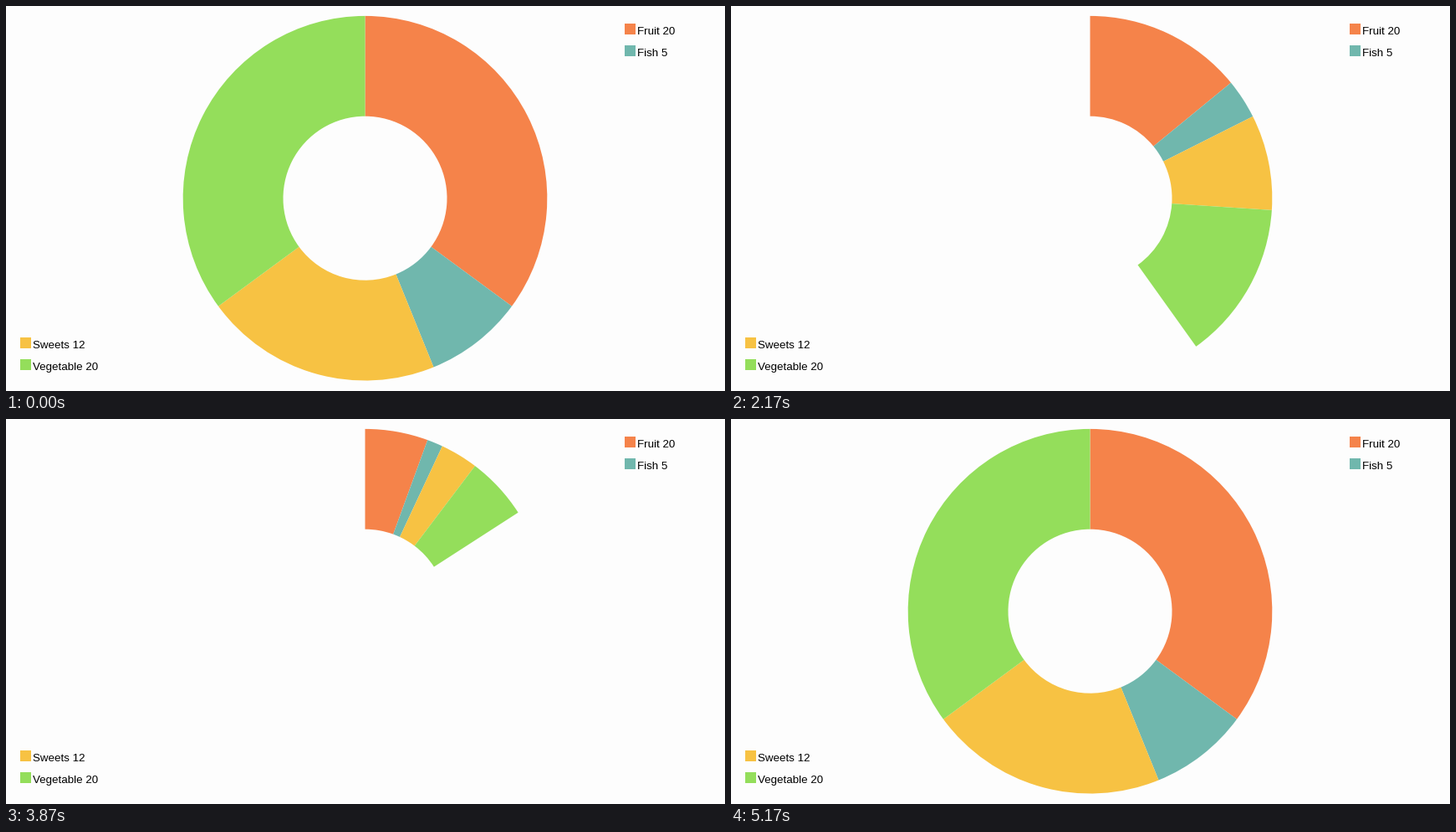
Animation of 860x460 px, one loop 7.4 s. Source, as a matplotlib script:

```python
import numpy as np
import matplotlib.pyplot as plt
from matplotlib.animation import FuncAnimation
from matplotlib.patches import Rectangle, Wedge

WIDTH, HEIGHT, DPI = 860, 460, 80
LOOP, INTERVAL = 7400, 20
STEP = LOOP / 170  # the ring is redrawn less often than the figure

CENTER, OUTER, INNER = (429.5, 229.7), 217.8, 98

# name, value, colour, legend swatch corner
SLICES = [
    ("Fruit", 20, "#f5834a", (740, 20.5)),
    ("Fish", 5, "#70b7ad", (740, 46.5)),
    ("Sweets", 12, "#f7c243", (17, 396)),
    ("Vegetable", 20, "#94de5b", (17, 422)),
]
values = np.array([s[1] for s in SLICES])
bounds = np.concatenate([[0], np.cumsum(values)]) / values.sum()

# Redraw step -> phase: 0 to 1 closes the ring, 1 to 2 opens it again
STEPS = [24.5, 35, 50, 63, 72.4, 79, 92, 97, 110, 119]
PHASES = [0, 0.219, 0.5354, 0.8032, 1, 1.1353, 1.403, 1.5234, 1.792, 2]


def ease(x):
    """Cubic ease in and out."""
    return 4 * x**3 if x < 0.5 else 1 - 4 * (1 - x)**3


def ring_part(ms):
    """Fraction of the full circle that is drawn at a given time."""
    step = int((ms + 18) / STEP)
    phase = np.interp(step, STEPS, PHASES)
    return 1 - ease(phase) if phase < 1 else ease(phase - 1)


fig = plt.figure(figsize=(WIDTH / DPI, HEIGHT / DPI), dpi=DPI,
                 facecolor="#fdfdfd")
ax = fig.add_axes([0, 0, 1, 1])
ax.set(xlim=(0, WIDTH), ylim=(HEIGHT, 0))
ax.axis("off")

wedges = []
for name, value, color, (x, y) in SLICES:
    ax.add_patch(Rectangle((x, y), 13, 13, fc=color, lw=0))
    ax.text(x + 15, y + 13, f"{name} {value}", va="baseline", color="black",
            family="Liberation Sans", size=13.4 * 72 / DPI)
    wedge = Wedge(CENTER, OUTER, -90, -89, width=OUTER - INNER,
                  fc=color, lw=0)
    wedges.append(ax.add_patch(wedge))


def draw(frame):
    part = ring_part(frame * INTERVAL)
    angles = -90 + 360 * part * bounds
    for wedge, start, end in zip(wedges, angles, angles[1:]):
        wedge.set_visible(part > 1e-5)
        wedge.set_theta1(start)
        wedge.set_theta2(end)
    return wedges


anim = FuncAnimation(fig, draw, frames=LOOP // INTERVAL, interval=INTERVAL,
                     init_func=lambda: draw(0), repeat=True, repeat_delay=0)
plt.show()
```
